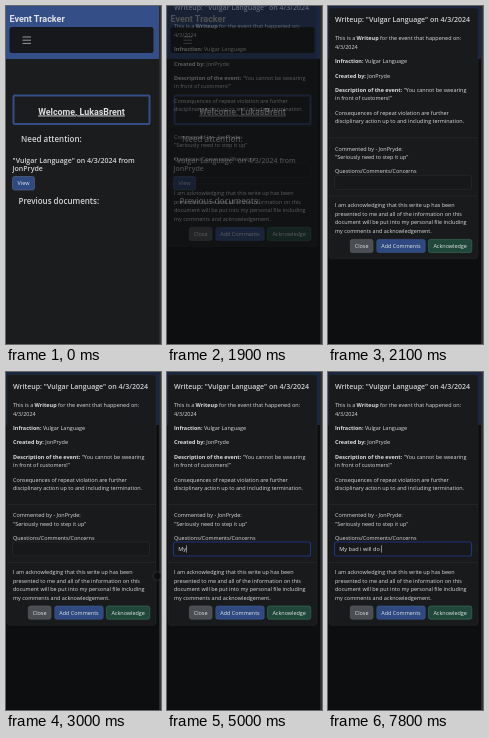
These frames come from a looping animation (155x338 px, 8 s). An HTML page:

```html
<!DOCTYPE html>
<html lang="en">
<head>
<meta charset="utf-8">
<title>Event Tracker</title>
<style>
html, body { margin: 0; width: 100%; height: 100%; overflow: hidden; background: #1b1c1e; }
svg { display: block; width: 100%; height: 100%; }
text { font: 5.46px 'Open Sans', 'Noto Sans', sans-serif; fill: #dcdddf; }
.brand { font: bold 9px Roboto, sans-serif; fill: #e2e3e6; }
.welcome { font: bold 8.9px Roboto, sans-serif; fill: #dedede; text-decoration: underline; text-anchor: middle; }
.heading { font-size: 8px; font-weight: 600; fill: #d6d6d6; }
.notice { font-size: 7px; font-weight: 600; fill: #d6d6d6; }
.title { font-size: 7px; font-weight: 600; fill: #d2d3d5; }
.label { text-anchor: middle; fill: #e2e4e8; }
.b { font-weight: 700; }
.rule { stroke: #2a2c2f; stroke-width: .6; }
#typed { font-size: 5.6px; fill: #e4e5e7; }
</style>
</head>
<body>
<svg viewBox="0 0 155 338" preserveAspectRatio="none">
  <rect width="155" height="338" fill="#1b1c1e"/>
  <rect width="153" height="53" fill="#344f88"/>
  <rect x="153.4" width="1.6" height="338" fill="#333436"/>
  <text class="brand" x="3.5" y="15.5">Event Tracker</text>
  <rect x="3.5" y="21" width="144" height="26" rx="2.5" fill="#17181b"/>
  <path d="M16.5 31h8.5M16.5 34.2h8.5M16.5 37.4h8.5" stroke="#a5a6a8" stroke-width=".9"/>
  <rect x="7.5" y="89.5" width="136" height="28.5" rx="1" fill="none" stroke="#344f88" stroke-width="2"/>
  <text class="welcome" x="75.5" y="108.5">Welcome, LukasBrent</text>
  <text class="heading" x="15" y="136">Need attention:</text>
  <text class="notice" x="6.5" y="157">"Vulgar Language" on 4/3/2024 from</text>
  <text class="notice" x="6.5" y="165.2">JonPryde</text>
  <rect x="6.5" y="170.5" width="22" height="13.5" rx="2" fill="#2f4a80" stroke="#5b6b8c" stroke-width=".6"/>
  <text class="label" x="17.5" y="179.2">View</text>
  <text class="heading" x="12.5" y="198">Previous documents:</text>

  <rect id="backdrop" width="153" height="338"/>

  <g id="modal">
    <rect x="1" y="2.8" width="149" height="250.5" rx="2.8" fill="#191a1c" stroke="#27292b" stroke-width=".5"/>
    <text class="title" x="7" y="17">Writeup: "Vulgar Language" on 4/3/2024</text>
    <path class="rule" d="M1 132.5h149M1 190.5h149"/>
    <g id="copy"></g>
    <rect id="field" x="6.5" y="170" width="137" height="14" rx="2" fill="#17181a"/>
    <text id="typed" x="11.3" y="179.2"></text>
    <rect id="caret" y="173.4" width=".6" height="7.2" fill="#d0d2d4"/>
    <g id="buttons"></g>
  </g>

  <circle id="cursor" r="4.2" fill="#0a0b0c" fill-opacity=".65" stroke="#3d4043" stroke-width=".6"/>
</svg>
<script>
const LOOP = 8000;
const $ = id => document.getElementById(id);
const clamp = v => Math.max(0, Math.min(1, v));
const span = (t, start, length) => clamp((t - start) / length);

// Baseline, bold lead-in, plain remainder
const lines = [
  [35, '', 'This is a <tspan class="b">Writeup</tspan> for the event that happened on:'],
  [43.5, '', '4/3/2024'],
  [58, 'Infraction:', ' Vulgar Language'],
  [72.2, 'Created by:', ' JonPryde'],
  [86.5, 'Description of the event:', ' "You cannot be swearing'],
  [95, '', 'in front of customers!"'],
  [109.5, '', 'Consequences of repeat violation are further'],
  [118, '', 'disciplinary action up to and including termination.'],
  [145.2, '', 'Commented by - JonPryde:'],
  [153.8, '', '"Seriously need to step it up"'],
  [168, '', 'Questions/Comments/Concerns'],
  [202, '', 'I am acknowledging that this write up has been'],
  [210.5, '', 'presented to me and all of the information on this'],
  [219, '', 'document will be put into my personal file including'],
  [227.5, '', 'my comments and acknowledgement.']
];
$('copy').innerHTML = lines.map(([y, lead, rest]) =>
  `<text x="7" y="${y}"><tspan class="b">${lead}</tspan>${rest}</text>`).join('');

const buttons = [
  [22.3, 22.7, 'Close', '#4a4d51', '#5c5f63'],
  [48.8, 48.4, 'Add Comments', '#2f4a80', '#3d588f'],
  [100.5, 43.3, 'Acknowledge', '#20483a', '#3e7058']
];
$('buttons').innerHTML = buttons.map(([x, w, label, fill, edge]) =>
  `<rect x="${x}" y="234" width="${w}" height="13.2" rx="2" fill="${fill}" stroke="${edge}" stroke-width=".6"/>
   <text class="label" x="${x + w / 2}" y="242.5">${label}</text>`).join('');

const message = 'My bad i will do ';
const keyTimes = [4600, 5000, 5300, 5300, 5400, 5500, 6100, 6500, 6600,
  6800, 6900, 7100, 7200, 7400, 7600, 7600, 7800];
const OPEN = 1845, FOCUS = 3700;

// CSS "ease-out": cubic-bezier(0, 0, .58, 1)
function easeOut(x) {
  let low = 0, high = 1;
  for (let i = 0; i < 20; i++) {
    const s = (low + high) / 2;
    if (1.74 * (1 - s) * s * s + s ** 3 < x) low = s; else high = s;
  }
  return 3 * (1 - low) * low * low + low ** 3;
}

const mix = (a, b, k) => `rgb(${a.map((v, i) => Math.round(v + (b[i] - v) * k))})`;

function draw(t) {
  $('backdrop').setAttribute('opacity', span(t, 1690, 150) * .5);
  $('modal').setAttribute('opacity', span(t, OPEN, 150));
  $('modal').setAttribute('transform', `translate(0 ${-17.75 * (1 - easeOut(span(t, OPEN, 300)))})`);

  const focus = span(t, FOCUS, 150);
  $('field').setAttribute('stroke', mix([40, 42, 45], [28, 52, 122], focus));
  $('field').setAttribute('stroke-width', .7 + .5 * focus);
  const count = keyTimes.filter(k => k <= t).length;
  $('typed').textContent = message.slice(0, count).replace(/ /g, '\u00a0');
  const lastKey = count ? keyTimes[count - 1] : FOCUS;
  const caretOn = t >= FOCUS && (t - lastKey) % 1000 < 500;
  $('caret').setAttribute('visibility', caretOn ? 'visible' : 'hidden');
  $('caret').setAttribute('x', 11.3 + (count ? $('typed').getComputedTextLength() : 0));

  const p = span(t, 3000, 600), k = p * p * (3 - 2 * p);
  $('cursor').setAttribute('visibility', t >= 3000 && t < 3800 ? 'visible' : 'hidden');
  $('cursor').setAttribute('cx', 151 - 89 * k);
  $('cursor').setAttribute('cy', 204 - 29 * k);
}

const start = performance.now();
function frame() {
  draw((performance.now() - start) % LOOP);
  requestAnimationFrame(frame);
}
frame();
</script>
</body>
</html>
```
